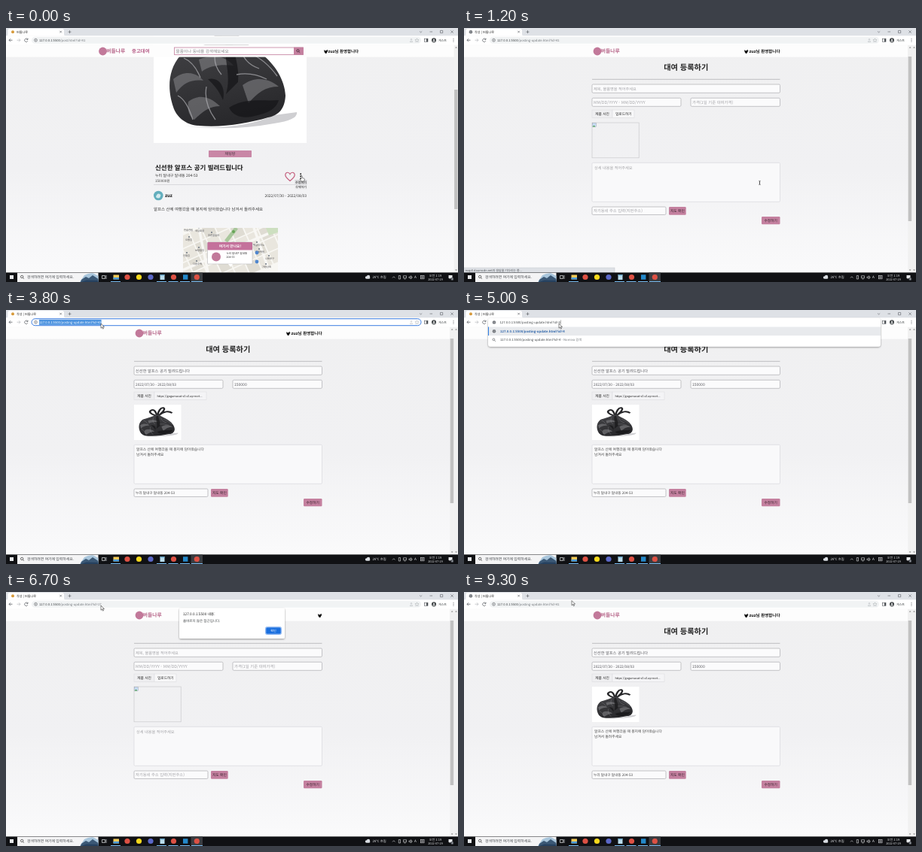
An HTML page that plays this animation: 600 by 338 pixels, repeating every 9.4 s.

```html
<!DOCTYPE html>
<html lang="ko">
<head>
<meta charset="utf-8">
<style>
html, body { margin: 0; width: 100%; height: 100%; overflow: hidden; background: #f3f3f4; }
svg { display: block; width: 100vw; height: 100vh; }
text { font-family: "Noto Sans CJK KR", "Noto Sans CJK", sans-serif; text-rendering: geometricPrecision; white-space: pre; }
</style>
</head>
<body>
<script>
const LOOP = 9400;
const PINK = '#c4809f';
const SHOP = '버들나루';
const NICK = 'zuz';
const AREA = '누리 달내구 달내동';
const LOT = '204-53';

const text = (x, y, s, size, fill = '#222', extra = '') =>
  `<text x="${x}" y="${y}" font-size="${size}" fill="${fill}" ${extra}>${s}</text>`;
const rect = (x, y, w, h, fill, extra = '') =>
  `<rect x="${x}" y="${y}" width="${w}" height="${h}" fill="${fill}" ${extra}/>`;
const dot = (x, y, r, fill, extra = '') =>
  `<circle cx="${x}" cy="${y}" r="${r}" fill="${fill}" ${extra}/>`;
const line = (d, stroke, w = 0.7, extra = '') =>
  `<path d="${d}" fill="none" stroke="${stroke}" stroke-width="${w}" ${extra}/>`;
const shape = (d, fill, extra = '') => `<path d="${d}" fill="${fill}" ${extra}/>`;
const group = (id, body) => `<g id="${id}">${body}</g>`;
const MID = ' text-anchor="middle"', END = ' text-anchor="end"', BOLD = ' font-weight="700"';

const field = (x, y, w, h, stroke = '#adadb1', fill = '#fbfbfc') =>
  rect(x, y, w, h, fill, `rx="1.4" stroke="${stroke}" stroke-width=".7"`);
const button = (x, y, w, h, label) =>
  rect(x, y, w, h, PINK, 'rx="1.2"') + text(x + w / 2, y + h / 2 + 1.8, label, 4.75, '#33222b', MID);
const tag = (x, w, fill) => rect(x, 109, w, 10.5, fill, 'stroke="#dcdce0" stroke-width=".6"');
const hint = (x, y, s, size = 5.2) => text(x, y, s, size, '#a4a4a8');
const globe = (x, y) => dot(x, y, 2.2, '#5f6368') +
  line(`M${x - 2} ${y}h4M${x} ${y - 2}v4`, '#dfe1e5', 0.4);
const lens = (x, y, r, color) => dot(x, y, r, 'none', `stroke="${color}" stroke-width=".7"`) +
  line(`M${x + r * 0.7} ${y + r * 0.7}l1.6 1.6`, color);
const pet = x => shape(`M${x} 29l1.4 1.2 1.6-.2 1-1.4.7 1.6 .6.4-1.2 1.2-.6 1.8-1.6.5-1-1.2-.9-2z`, '#111');
const brand = (x, y) => dot(x, y, 5.4, '#c2799a') + text(x + 4.8, y + 2.3, SHOP, 6.8, '#b8688b', BOLD);

// Photo on a 203 by 203 square.
const bag = rect(0, 0, 203, 203, '#fff') +
  shape('M40 180Q110 188 160 166L190 162Q192 172 160 177Q100 188 40 180Z', '#cfcfd2') +
  line('M92 62C70 52 62 40 74 32C88 24 94 44 98 60M102 60C104 38 114 16 126 18C138 24 122 44 106 62M108 60C128 38 150 34 164 48', '#262629', 8, 'stroke-linejoin="round"') +
  shape('M36 86C50 78 75 72 94 58L108 58C118 70 132 74 145 86C160 98 174 118 175 140C174 158 166 166 152 169C125 177 90 183 60 180C42 179 30 168 26 155C20 138 16 108 36 86Z', 'url(#bagTone)') +
  shape('M26 118C40 106 56 108 66 120C52 118 40 122 30 136ZM46 148C58 138 74 140 88 154C74 154 64 162 54 172C48 168 44 160 46 148ZM60 92C80 84 96 88 106 100C90 98 74 100 64 108ZM118 126C134 114 152 116 166 128C148 128 138 136 126 150Z', '#87878b', 'opacity=".55"') +
  shape('M96 66C92 92 104 112 96 138L112 122C114 100 106 84 104 64ZM72 118C88 114 96 130 92 146C86 132 80 126 72 118ZM100 156C122 142 146 148 166 146C162 160 148 164 130 168C118 170 106 168 100 156Z', '#151517', 'opacity=".7"') +
  line('M40 90Q54 96 62 116M84 74Q76 96 90 112M116 76Q118 96 140 104M32 140Q44 146 52 172M70 128Q66 150 82 172M128 84Q148 92 164 114M110 112Q130 108 150 118', '#b0b0b4', 1.3, 'opacity=".7"');

function chrome() {
  const ink = '#4d5156', pale = '#84888d';
  return rect(0, 0, 600, 10.5, '#dee1e6') +
    shape('M0 10.5Q2.5 10.5 2.5 8V3.5Q2.5 1 5 1H74.5Q77 1 77 3.5V8Q77 10.5 79.5 10.5Z', '#fff') +
    rect(0, 10.3, 600, 12.4, '#fff') +
    group('petIcon', dot(9, 5.2, 2, '#d79a3c')) + group('globeIcon', globe(9, 5.2)) +
    group('tabPost', text(14, 6.8, SHOP, 4.1)) +
    group('tabForm', text(14, 6.8, '작성 | ' + SHOP, 4.1)) +
    line('M71.3 3.8l2.6 2.6m0-2.6l-2.6 2.6M82.5 5.2h4M84.5 3.2v4', ink, 0.6) +
    line('M549 4.4l1.6 1.5 1.6-1.5M562.5 5h3.6M576.5 3.4h3.2v3.2h-3.2zM590.4 3.4l3.4 3.4m0-3.4l-3.4 3.4', ink, 0.55) +
    line('M8.5 16.2h-4.5m2-2l-2 2 2 2', ink) +
    line('M14.5 16.2h4.5m-2-2l2 2-2 2', '#b4b7bb') +
    line('M28.8 15.2a2.2 2.2 0 1 0 .1 2M29 13.6v1.8h-1.8', ink) +
    rect(34, 11.7, 517, 9, '#f1f3f4', 'id="omni" rx="4.5" stroke-width="1"') +
    dot(39.5, 16.2, 1.9, 'none', `stroke="${ink}" stroke-width=".6"`) + line('M39.5 15.9v1.2M39.5 14.9v.4', ink, 0.6) +
    line('M536.5 17.5v1h3v-1M538 17.5v-3m-1 1l1-1 1 1', pale, 0.35) +
    line('M545.5 13.8l.8 1.7 1.8.2-1.4 1.2.4 1.8-1.6-.9-1.6.9.4-1.8-1.4-1.2 1.8-.2z', pale, 0.35) +
    rect(555.5, 14.2, 4.5, 4, 'none', `stroke="${ink}" stroke-width=".6"`) + rect(558, 14.2, 2, 4, ink) +
    dot(568, 16.2, 3, '#3c4043') + dot(568, 15.3, 0.9, '#fff') + shape('M566.3 18a1.7 1.5 0 0 1 3.4 0z', '#fff') +
    text(574, 17.7, '게스트', 4, '#3c4043') +
    [14.4, 16.2, 18].map(y => dot(594, y, 0.5, ink)).join('') +
    rect(44, 12.8, 84, 7, '#4a92df', 'id="mark"') +
    text(44, 17.8, '', 4.2, '#5f6368', 'id="url"');
}

const scroller = (x, top, bottom) => rect(x, 22.7, 5.5, 302.8, '#f1f1f1') +
  shape(`M${x + 1.5} 26.5h2.6l-1.3-1.6zM${x + 1.5} 321.5h2.6l-1.3 1.6z`, '#777') +
  (bottom ? rect(x + 0.4, top, 4.5, bottom - top, '#c1c1c1') : '');

function map() {
  const label = (x, y, s) => text(x, y, s, 3.3, '#45454a') + dot(x + 5, y - 5, 1, '#6b7580');
  let blocks = '';
  for (let i = 0; i < 9; i++)
    for (let j = 0; j < 5; j++)
      blocks += rect(224 + i * 17, 252 + j * 17, 15.2, 15.4, (i + j) % 3 ? '#e9e6de' : '#dfdcd3');
  return `<g clip-path="url(#mapClip)">${rect(235, 266, 126, 60, '#f8f7f3')}
    <g transform="rotate(-24 298 295)">${blocks}</g>
    ${line('M235 322L361 268M329 266L350 325M256 266L268 325', '#f8f7f4', 3.5)}
    ${line('M292 284L306 266', '#a9c79c', 5)}${shape('M345 266h16v6l-12 4z', '#cddfc0')}
    ${label(236, 270, '한솔연립')}${label(251, 270.5, '새길로얄')}${label(238, 283, '오름집')}
    ${label(268, 277, '푸른골빌라')}${label(251, 297, '보람빌딩')}${label(235, 304, '안뜰집')}
    ${label(328, 290, '햇살피아노')}${label(331, 299, '조율학원')}${label(344, 308, '나래포구')}
    ${label(248, 315, '다솜주택')}${label(340, 319, '가람상회')}
    ${dot(333, 299, 2.4, '#4f86cf')}${dot(333, 311, 2.4, '#4f86cf')}${dot(302, 271, 2, '#67a457')}
    ${rect(267.5, 285, 59.5, 29, '#fff', 'stroke="#b9b9bd" stroke-width=".6" rx="1"')}
    ${shape('M295 314h6l-3 4z', '#fff')}
    ${rect(267.5, 285, 59.5, 10.5, '#c4719b', 'rx="1"')}
    ${text(297.5, 292.3, '여기서 만나요!', 4.8, '#fff', MID + BOLD)}
    ${dot(279, 304.5, 6, '#c2799a')}
    ${text(292.5, 301.2, AREA, 3.5)}${text(292.5, 306, LOT, 3.5)}</g>`;
}

function post() {
  return rect(0, 22.7, 600, 303, 'url(#pageTone)') +
    `<g transform="translate(196 -50)">${bag}</g>` + rect(0, 22.7, 595, 15.9, '#fdfdfd') +
    brand(128.5, 31) + text(167, 33.1, '중고대여', 6.4, '#b8608a', BOLD) +
    rect(223.5, 26, 171, 9.5, '#fff', `stroke="${PINK}" stroke-width=".8"`) +
    text(225.5, 32.6, '물품이나 동네를 검색해보세요', 5.6, '#88888c') +
    rect(382, 25.7, 12.8, 10.1, PINK) + lens(387.5, 30.2, 1.6, '#2d1a24') +
    pet(422.3) + text(427.5, 32.9, NICK + '님 환영합니다', 5.45, '#111', BOLD) +
    rect(269, 163, 57, 9, '#c987a6', 'rx=".8"') + text(297.5, 169.4, '채팅방', 5, '#4b3340', MID) +
    text(198, 188.5, '신선한 알프스 공기 빌려드립니다', 8.5, '#111', BOLD) +
    text(198, 198, `${AREA} ${LOT}`, 5, '#333') + text(198, 205.2, '150000원', 4.6, '#444') +
    line('M377 203.5C372 199.5 370.5 197 370.8 195C371.3 191.6 375.5 191.3 377 194.5C378.5 191.3 382.7 191.6 383.2 195C383.5 197 382 199.5 377 203.5Z', '#c5607f', 1.2) +
    [194.2, 197.3, 200.4].map(y => dot(391.2, y, 0.95, '#111')).join('') +
    line('M196 208.5H399', '#cfcfd3', 0.7) +
    rect(383.5, 202, 16, 6.4, '#d4d4d7') + rect(383.5, 208.4, 16, 6.2, '#ececee') +
    text(391.5, 206.8, '수정하기', 4.05, '#222', MID) + text(391.5, 213.2, '삭제하기', 4.05, '#222', MID) +
    dot(202.3, 223, 6.3, '#62aebd') + shape('M199 225q1-5 4-4.500l2.500 1.500-1 3.500q-3 2-5.500-.5z', '#d3eaee') +
    text(211, 225.1, NICK, 6, '#111', BOLD) +
    text(399, 224.7, '2022/07/30 - 2022/08/03', 4.9, '#333', END) +
    text(196, 243.2, '알프스 산에 여행갔을 때 봉지에 담아왔습니다 남겨서 돌려주세요', 5.42, '#333') +
    map() + scroller(594.7, 82, 241);
}

function form() {
  const empty = hint(172, 82.6, '제목, 물품명을 적어주세요') +
    hint(172, 101, 'MM/DD/YYYY - MM/DD/YYYY', 5.4) + hint(303, 101, '가격(1일 기준 대여가격)', 5.4) +
    tag(197, 29, '#f7f7f8') + text(201, 116, '업로드하기', 4.7) +
    rect(170, 126, 62.2, 46.8, 'none', 'stroke="#c4c4c6" stroke-width=".6"') +
    rect(170.5, 126.5, 4.8, 5, '#c7dcf5', 'stroke="#8a949e" stroke-width=".4"') + shape('M170.7 131.4l2-2.2 1.5 2.2z', '#55a455') +
    hint(173, 188.4, '상세 내용을 적어주세요') + hint(172, 245.3, '자기동네 주소 입력(지번주소)', 5.3);
  const filled = text(172, 82.5, '신선한 알프스 공기 빌려드립니다', 5.25, '#55555a') +
    text(172, 100.8, '2022/07/30 - 2022/08/03', 4.75, '#55555a') + text(303, 100.8, '150000', 5, '#55555a') +
    tag(197, 69, '#f4f4f6') + text(200.5, 115.7, 'https://gogumacat-s3.s3.ap-nort...', 3.75) +
    `<g transform="translate(170 126) scale(.308 .2315)">${bag}</g>` +
    text(173, 187.2, '알프스 산에 여행갔을 때 봉지에 담아왔습니다', 4.78, '#444') +
    text(173, 193.6, '남겨서 돌려주세요', 4.78, '#444') + text(172, 245, `${AREA} ${LOT}`, 4.6, '#444');
  return rect(0, 22.7, 600, 303, 'url(#pageTone)') + rect(0, 22.7, 589, 16, '#fdfdfd') + brand(177, 31) +
    group('hello', pet(372.3) + text(419.5, 32.9, NICK + '님 환영합니다', 5.5, '#111', END + BOLD)) +
    group('guest', pet(414.2)) +
    text(294.8, 56.2, '대여 등록하기', 10.2, '#222', MID + BOLD) +
    line('M170 68.3H419.5', '#b0b0b4', 0.8) +
    field(170, 75, 249.5, 11.3) + field(170, 93.2, 118, 11.1) + field(301, 93.2, 118.5, 11.1) +
    tag(170, 27, '#efeff1') + text(174.3, 116, '제품 사진', 4.7) +
    field(170, 179.3, 249.5, 52, '#d9d9dd', '#f9f9fa') + field(170, 238, 98, 10.5) +
    button(272, 238, 22.7, 10.8, '지도 확인') + button(395, 251, 24.5, 10.3, '수정하기') +
    group('empty', empty) + group('filled', filled) +
    scroller(589.3, 38, 257) + scroller(594.7);
}

function overlays() {
  const drop = rect(32, 10.8, 521, 38, '#fff', 'rx="3.5" filter="url(#shade)"') +
    rect(32, 22.5, 521, 11.5, '#e8eaed') + rect(32, 22.5, 0.9, 11.5, '#1a73e8') +
    globe(40, 16.4) + globe(40, 28.2) + lens(39.4, 39.3, 1.4, '#5f6368') +
    text(47.5, 17.8, '', 4.2, '#3c4043', 'class="typed"') +
    text(48, 29.7, '', 4.2, '#2a62a8', 'class="typed"' + BOLD) +
    `<text x="48" y="41.3" font-size="4.2" fill="#3c4043"><tspan class="typed"></tspan><tspan fill="#70757a"> - Nomiva 검색</tspan></text>`;
  const alert = rect(230, 21.5, 140, 40.5, '#fff', 'rx="2" filter="url(#shade)"') +
    text(235, 31.3, '127.0.0.1:5500 내용:', 4.7) + text(235, 40.4, '올바르지 않은 접근입니다.', 4.5, '#3c4043') +
    rect(344.5, 46.5, 21, 10, '#fff', 'rx="1.8" stroke="#8fb8f2" stroke-width="1"') +
    rect(345.2, 47.2, 19.6, 8.6, '#1a6fdf', 'rx="1.3"') + text(355, 53, '확인', 4.1, '#fff', MID);
  return group('drop', drop) + group('alert', alert) + rect(0, 13.3, 0.35, 5.8, '#333', 'id="caret"') +
    group('status', rect(-1, 319, 201, 7, '#dee1e6', 'stroke="#c3c6ca" stroke-width=".5"') +
      text(1.5, 323.8, 'map0.daumcdn.net의 응답을 기다리는 중...', 3.95, '#4d5156'));
}

function taskbar() {
  const pale = '#e6e8ea';
  const apps = [[161, '#dd5144'], [176.5, '#f7d91c'], [192, '#5b68c8'], [222.5, '#dd5144'], [253.3, '#dd5144']];
  return rect(0, 325.4, 600, 12.6, '#101114') + rect(5, 329, 5, 5, pale) +
    rect(15, 325.8, 107.5, 12.2, '#f4f4f5') + lens(21.2, 331, 1.7, '#333') +
    text(28, 333.3, '검색하려면 여기에 입력하세요.', 4.85, '#44474b') +
    shape('M98 338L104 329Q110 325.8 116 326.5L122.5 330V338Z', '#a9c6dc') +
    shape('M100 335l6-4 4 2 5-4 7.5 5v4H99z', '#3b5875') + shape('M99 338l8-2.5 15.500 .5v2z', '#26415f') +
    line('M127.5 329.5h4v4h-4zM133 329v5', pale, 0.7) +
    rect(245.5, 325.4, 15.5, 12.6, '#3a3c40') + [[139, 13], [200, 13], [215.5, 13], [231, 13], [246, 15]].map(([x, w]) => rect(x, 337, w, 1, '#76b9ed')).join('') +
    rect(142.5, 328.5, 7.5, 6, '#f4ca58') + rect(142.5, 332, 7.5, 2.5, '#4a9bdb') +
    apps.map(([x, c]) => dot(x, 331.5, 3.6, c)).join('') +
    rect(204.5, 328, 6, 7, '#b9dcec') + rect(204.5, 328, 6, 1.4, '#5f9fc2') + rect(235, 328.3, 6.4, 6.4, '#2489ca') +
    dot(478.5, 332, 1.7, '#d9dde2') + dot(481, 331, 2.2, '#d9dde2') + rect(478.3, 331.5, 5, 2.2, '#d9dde2', 'rx="1.1"') +
    text(486.5, 333.2, '26°C 흐림', 4.3, pale) +
    line('M513 332.5l1.7-1.7 1.7 1.7M521.3 329.5v4.5h2.2v-4.5zM527.5 329.8h4v3h-4zM528.5 334h2M535 331h1.2l1.5-1.2v4l-1.5-1.2H535zM538.5 330.5q1.2 1.3 0 2.6', pale, 0.6) +
    text(542, 333.3, 'A', 4.6, pale) + rect(550.5, 329.5, 4.5, 4.3, 'none', `stroke="${pale}" stroke-width=".6"`) + line('M550.5 331.6h4.5M552.7 329.5v4.3', pale, 0.5) +
    text(570, 330.5, '오전 1:19', 4, pale, MID) + text(570, 336.2, '2022-07-29', 3.8, pale, MID) +
    shape('M587.5 329h5v4h-2.5l-1.3 1.3V333h-1.2z', pale) + dot(592.3, 334, 2, '#565b62') + text(592.3, 335.2, '2', 3, '#fff', MID);
}

const pointers = group('arrow', shape('M0 0V6.2L1.5 4.9 2.5 7.1 3.5 6.7 2.5 4.5H4.5Z', '#fff', 'stroke="#111" stroke-width=".5"')) +
  group('hand', shape('M-.8 0q.8-1 1.5 0v2.6l2.5.6q.8.3.6 1.3l-.6 2.5H-.5L-2.3 4.3q0-1 1.5-.2z', '#fff', 'stroke="#111" stroke-width=".5"')) +
  group('beam', line('M-1.1-2.6q1.1 0 1.1.6v4q0 .6-1.1.6M1.1-2.6Q0-2.6 0-2v4q0 .6 1.1.6', '#222', 0.55));

document.body.innerHTML = `<svg viewBox="0 0 600 338" preserveAspectRatio="none"><defs>
  <linearGradient id="pageTone" x2="0" y2="1"><stop stop-color="#f0f0f1"/><stop offset=".55" stop-color="#f1f1f3"/><stop offset="1" stop-color="#fafafb"/></linearGradient>
  <linearGradient id="bagTone" x2=".3" y2="1"><stop stop-color="#434347"/><stop offset=".5" stop-color="#37373a"/><stop offset="1" stop-color="#29292c"/></linearGradient>
  <clipPath id="mapClip"><rect x="235" y="266" width="126" height="60"/></clipPath>
  <filter id="shade" x="-5%" y="-15%" width="110%" height="140%"><feDropShadow dx="0" dy=".9" stdDeviation="1" flood-opacity=".4"/></filter></defs>
  ${group('post', post())}${group('form', form())}${chrome()}${overlays()}${taskbar()}${group('cursor', pointers)}</svg>`;

const $ = id => document.getElementById(id);
const typed = [...document.querySelectorAll('.typed')];

// Visible spans of each layer, in ms.
const spans = {
  post: [[0, 1100]], form: [[1100, LOOP]],
  tabPost: [[0, 1100]], tabForm: [[1100, LOOP]],
  petIcon: [[0, 1100], [1600, 8800]], globeIcon: [[1100, 1600], [8800, LOOP]],
  empty: [[1100, 1600], [6300, 9000]], filled: [[1600, 6300], [9000, LOOP]],
  hello: [[1100, 6300], [9000, LOOP]], guest: [[6300, 9000]],
  status: [[1100, 1700]], alert: [[6600, 8700]],
  mark: [[3800, 4300]], caret: [[4300, 6200]], drop: [[5000, 6200]],
  hand: [[0, 1100]], beam: [[1100, 2100]], arrow: [[2100, LOOP]]
};
const HOST = '127.0.0.1:5500';
const path = '/posting-update.html?id=';
const urls = [[0, '/post.html?id=41'], [1100, path + '41'], [5000, path + '4'], [5200, path],
  [5600, path + '1'], [5800, path + '17'], [8800, path + '41']];
const moves = [[0, 392.5, 197], [100, 392.5, 197], [700, 392.5, 204], [1100, 392.5, 206], [2100, 392.5, 206],
  [2700, 126, 17], [3000, 126, 17], [3200, 126, 18], [7600, 126, 18], [8500, 347.5, 42],
  [8650, 353, 50], [8750, 353, 50], [9200, 143, 11.5], [LOOP, 143, 11.5]];

const shown = (id, t) => spans[id].some(([a, b]) => t >= a && t < b);

function place(t) {
  const i = moves.findIndex(m => m[0] > t);
  const [a, x, y] = moves[i - 1], [b, u, v] = moves[i];
  const k = (t - a) / (b - a), e = k * k * (3 - 2 * k);
  return [x + (u - x) * e, y + (v - y) * e];
}

let last = '';
function draw(t) {
  for (const id in spans) $(id).style.display = shown(id, t) ? '' : 'none';
  $('cursor').setAttribute('transform', `translate(${place(t)})`);

  const selected = shown('mark', t), open = shown('drop', t);
  const focus = selected || shown('caret', t);
  $('omni').setAttribute('fill', focus ? '#fff' : '#f1f3f4');
  $('omni').setAttribute('stroke', focus ? '#3b7de0' : 'none');

  const tail = urls.filter(u => u[0] <= t).pop()[1];
  if (tail + selected !== last) {
    last = tail + selected;
    const [host, rest] = selected ? ['#fff', '#fff'] : ['#3c4043', '#70757a'];
    $('url').innerHTML = `<tspan fill="${host}">${HOST}</tspan><tspan fill="${rest}">${tail}</tspan>`;
    typed.forEach(el => el.textContent = HOST + tail);
    $('mark').setAttribute('width', $('url').getComputedTextLength());
  }
  $('caret').setAttribute('x', (open ? 47.8 : 44.3) + $('url').getComputedTextLength());
}

const start = performance.now();
function tick(now) {
  draw(Math.max(0, now - start) % LOOP);
  requestAnimationFrame(tick);
}
draw(0);
requestAnimationFrame(tick);
</script>
</body>
</html>
```
